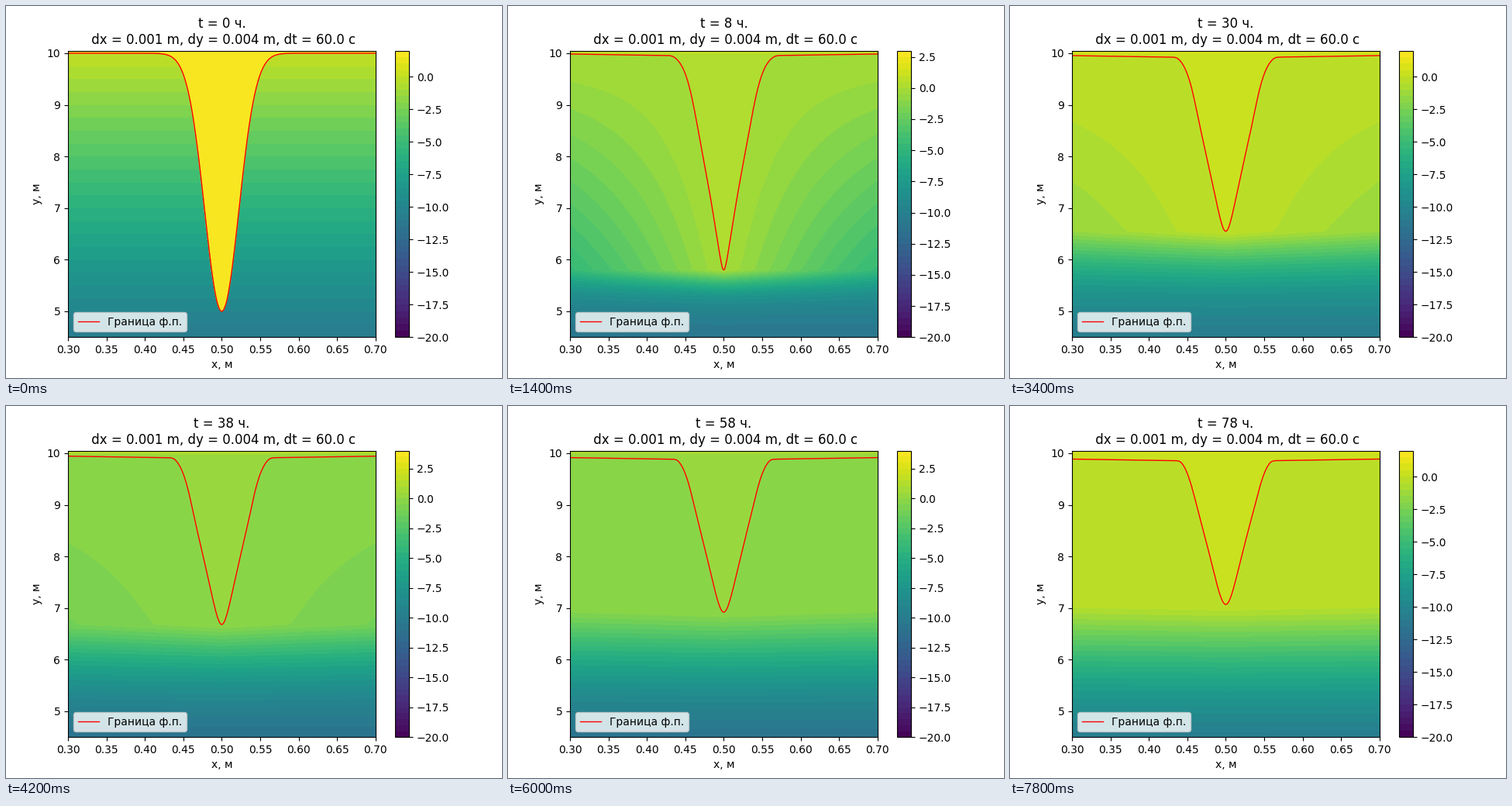
These frames come from a looping animation (640x480 px, 8 s). A matplotlib script:

```python
import math

import matplotlib.pyplot as plt
import numpy as np
from matplotlib.animation import FuncAnimation

Y_TOP, Y_BOTTOM = 10.05, 4.5
SPREAD = 0.001          # width of the initial gaussian channel
MELT = 0.047            # decay rate of the slowest thermal mode, 1/h
HALF_SPAN = 0.48

# hourly at first, then every second hour without midnights
HOURS = list(range(7)) + [h for h in range(8, 79, 2) if h % 24]

TIP_HOURS = np.array([0, 8, 18, 30, 46, 58, 78])
TIP_DEPTHS = [5.0, 4.2, 3.77, 3.45, 3.2, 3.08, 2.93]

xs = np.linspace(0.3, 0.7, 401)
ys = np.linspace(Y_BOTTOM, Y_TOP, 600)
off = np.abs(xs - 0.5)
depth = 10 - ys

fig = plt.figure(figsize=(6.4, 4.8), dpi=100)


def tip_depth(t):
    return np.interp(math.sqrt(t), np.sqrt(TIP_HOURS), TIP_DEPTHS)


def channel(t):
    """Depths from the tip upwards and the channel half-width at each."""
    tip = tip_depth(t)
    d = 0.002 + (tip - 0.002) * np.cos(np.linspace(0, np.pi / 2, 500)) ** 2
    rise = tip - d + 1e-9
    size = (2 + 1.5 * math.exp(-t / 12)) * (1 - math.exp(-t / 2))
    narrow = rise / (size ** 8 + rise ** 8) ** 0.125
    width = np.sqrt(SPREAD * np.log(5 / np.minimum(d, 5)) * narrow)
    return d, width


def front_depth(t, d, width):
    """Depth of the phase boundary along x."""
    if t == 0:
        return 5 * np.exp(-off ** 2 / SPREAD)
    groove = np.interp(off, width, d, right=0)
    flat = 0.004 + 0.0014 * t + 0.045 * min(t / 8, 1) * (1 - off / 0.2)
    return (groove ** 5 + flat ** 5) ** 0.2


def surface_temp(t):
    day = 2 * math.pi * t / 24
    return (2.22 + 1.63 * math.cos(day - 2 * math.pi * 12.7 / 24)
            + 0.05 * math.cos(2 * day - 2 * math.pi * 10 / 12))


def chill(dist, t):
    """Share of the initial cold left at a distance from the channel."""
    age = MELT * t / (1 + t / 300)
    total = 0
    for n in range(1, 18, 2):
        total = total + (4 / (math.pi * n) * math.exp(-n * n * age)
                         * np.sin(n * math.pi * dist / (2 * HALF_SPAN)))
    return np.clip(total, 0, 1)


def field(t, d, width, front):
    cold = -2 * depth[:, None] + 0 * xs
    water = depth[:, None] < front
    if t == 0:
        return np.where(water, 1.8, cold - 0.01)
    row_width = np.interp(depth, d[::-1], width[::-1], right=0)
    dist = np.clip(off - row_width[:, None], 0, None)
    reach = 0.18 * math.sqrt(t)
    below = np.maximum(depth - tip_depth(t), 0)
    warmed = np.array([math.erfc(u / reach) for u in below])
    ice = cold * (1 - (1 - chill(dist, t)) * warmed[:, None]) - 0.02
    layer = np.exp((ys - Y_TOP) / 0.03)
    wet = 0.2 + (surface_temp(t) - 0.2) * layer
    return np.where(water, wet[:, None], ice)


def draw(i):
    t = HOURS[i]
    fig.clf()
    ax = fig.add_axes([0.125, 0.11, 0.62, 0.77])
    cax = fig.add_axes([501.6 / 640, 0.11, 18.48 / 640, 0.77])

    d, width = channel(t)
    front = front_depth(t, d, width)
    top = 2.0 if t == 0 else math.ceil(surface_temp(t) * 2) / 2
    levels = np.arange(-20, top + 0.25, 0.5)
    fill = ax.contourf(xs, ys, field(t, d, width, front), levels=levels)
    fig.colorbar(fill, cax=cax)

    ax.plot(xs, 10 - front, color="red", lw=1, label="Граница ф.п.")
    ax.set_xlim(0.3, 0.7)
    ax.set_ylim(Y_BOTTOM, Y_TOP)
    ax.set_xlabel("x, м")
    ax.set_ylabel("y, м")
    ax.set_title(f"t = {t} ч.\n dx = 0.001 m, dy = 0.004 m, dt = 60.0 c")
    ax.legend(loc="lower left")
    return []


anim = FuncAnimation(fig, draw, frames=len(HOURS), interval=200,
                     repeat=True, repeat_delay=0, blit=False)
plt.show()
```
